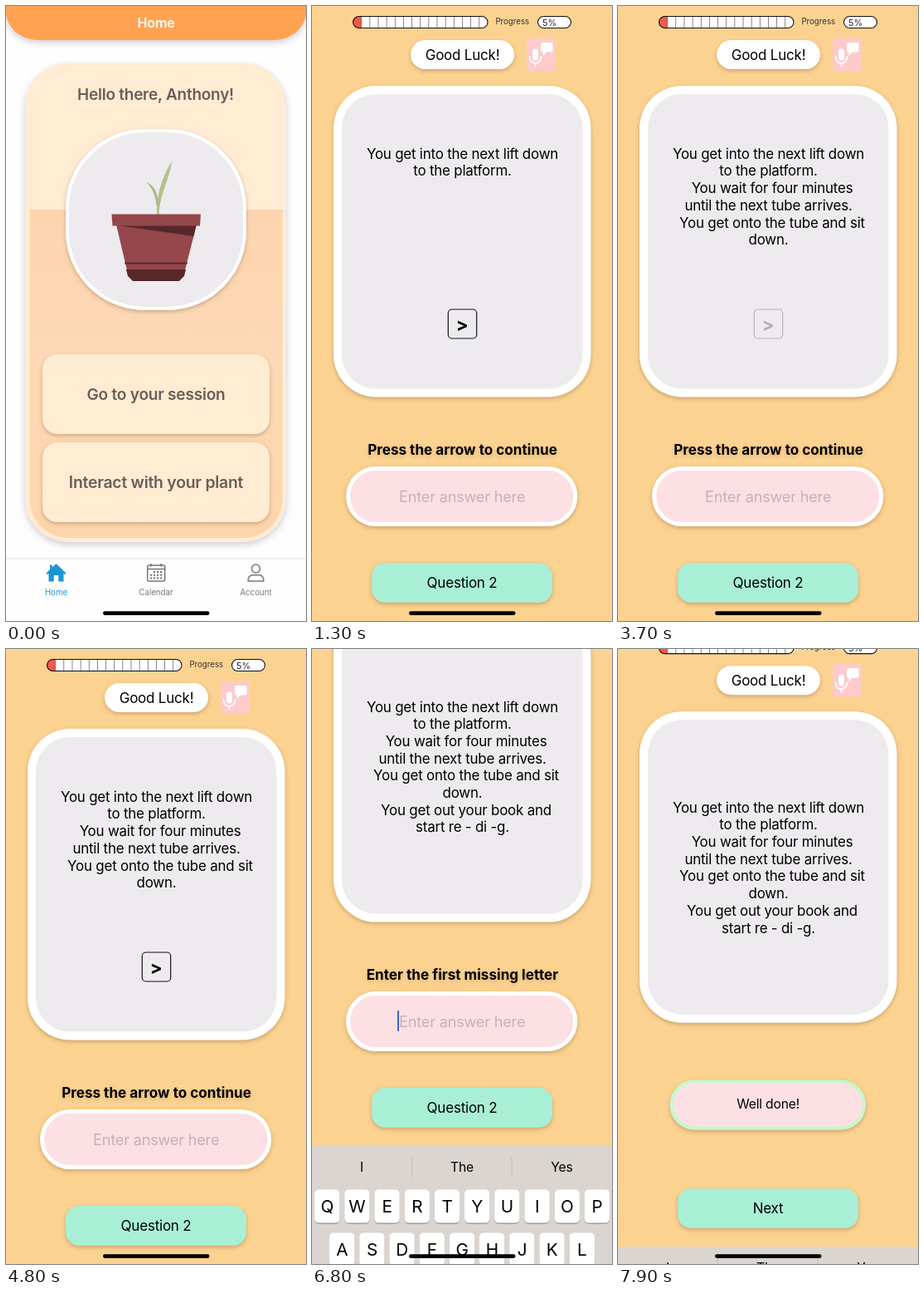
Recreate the animation shown at these times as an HTML page. Size 362 px wide and 740 px high, loop 8 s.

```html
<!DOCTYPE html>
<html lang="en">
<head>
<meta charset="utf-8">
<title>Plant app walkthrough</title>
<style>
  html, body { margin: 0; width: 100%; height: 100%; overflow: hidden; background: #fff; }
  svg { display: block; width: 362px; height: 740px; }
  text { font-family: Inter, Roboto, "Liberation Sans", sans-serif; text-anchor: middle; letter-spacing: -.013em; white-space: pre; }
  .wide { letter-spacing: 0; }
  .bold { font-weight: 700; letter-spacing: 0; }
  .semi { font-weight: 600; }
  .lift { filter: drop-shadow(.5px 2px 2.5px rgba(90, 60, 30, .3)); }
  .soft { filter: drop-shadow(0 3px 4px rgba(90, 70, 110, .28)); }
  .line { fill: none; stroke-linecap: round; stroke-linejoin: round; }
</style>
</head>
<body>
<svg id="stage" viewBox="0 0 362 740"></svg>
<script>
const W = 362, H = 740, LOOP = 8000, TICK = 100;

// markup helpers
const box = (x, y, w, h, r, fill, more = '') =>
  `<rect x="${x}" y="${y}" width="${w}" height="${h}" rx="${r}" fill="${fill}" ${more}/>`;
const text = (str, x, y, size, more = '') =>
  `<text x="${x}" y="${y}" font-size="${size}" ${more}>${str}</text>`;
const path = (d, more = '') => `<path d="${d}" ${more}/>`;
const line = (d, color, width) =>
  path(d, `class="line" stroke="${color}" stroke-width="${width}"`);
const group = (id, inner, more = '') => `<g id="${id}" ${more}>${inner}</g>`;
const each = (n, f) => Array.from({ length: n }, (_, i) => f(i)).join('');

const plant = () =>
  box(74, 150, 214, 214, 93, '#eeebef', 'stroke="#fff" stroke-width="4" class="lift"') +
  path('M182 251 C181 232 187 207 200 187 C198 207 186 224 184.5 251Z', 'fill="#b3c088"') +
  path('M181.5 240 C181 229 176 217 169 212 C179 215 184 226 183.5 240Z', 'fill="#a9b780"') +
  path('M133 263 H230 L216 318 H146Z', 'fill="#95474b"') +
  path('M134 264 H229.5 L226.5 277Z', 'fill="#56282b"') +
  path('M143 308.5 H219 L218.5 310.5 H143.5Z', 'fill="#56282b"') +
  path('M145 317 H217 L215 325 L209 331 H153 L147 325Z', 'fill="#56282b"') +
  path('M127.5 250.5 H235 L234 264.5 H128.5Z', 'fill="#95474b"');

const tabs = () => {
  const gray = '#777';
  return box(0, 665, W, 75, 0, '#fefefe') + box(0, 664.5, W, 1, 0, '#e4e4e6') +
    path('M60.5 671 L72.5 682.5 L71 684 L69.5 682.7 V692.5 H63.3 V685 H57.7 V692.5 H51.5 V682.7 L50 684 L48.5 682.5 L53 678 V672.5 H55.8 V675.5Z', 'fill="#1b96d2"') +
    box(170.7, 673, 21, 19, 1.5, 'none', `stroke="${gray}" stroke-width="1.5"`) +
    line('M171 677.5 H191.5 M175 671.5 V674 M187 671.5 V674', gray, 1.6) +
    each(11, i => box(174 + (i + 1) % 4 * 4, 680 + (i + 1 >> 2) * 3.7, 2.2, 2, 0, gray)) +
    `<circle cx="301.5" cy="677" r="5" fill="none" stroke="${gray}" stroke-width="1.5"/>` +
    line('M292 692 C292 687 294.5 684.8 298 684.8 H305 C308.5 684.8 311 687 311 692Z', gray, 1.5) +
    text('Home', 60.5, 709.3, 9.7, 'class="wide" fill="#1b96d2"') +
    text('Calendar', 181, 709.3, 9.7, `class="wide" fill="${gray}"`) +
    text('Account', 301.5, 709.3, 9.7, `class="wide" fill="${gray}"`);
};

const home = () => {
  const ink = 'class="semi" fill="#6b5d5b"';
  const cream = '#ffecd3';
  return box(0, 0, W, H, 0, '#fefefe') +
    path('M0 0 H362 V11 C358 29 343 41 322 41 H40 C19 41 4 29 0 11Z', 'fill="#ffa352" class="soft"') +
    text('Home', 181, 25.7, 16.2, 'class="semi" fill="#fff"') +
    box(23, 69, 315, 576, 52, cream, 'class="soft"') +
    path('M28.5 245 H333.5 V593 A47 47 0 0 1 286.5 640 H75.5 A47 47 0 0 1 28.5 593Z', 'fill="url(#peach)"') +
    text('Hello there, Anthony!', 180.5, 113, 19, ink) +
    plant() +
    box(44, 419, 274, 96, 18, cream, 'class="lift"') +
    box(44, 525, 274, 96, 18, cream, 'class="lift"') +
    text('Go to your session', 181, 474, 19.1, ink) +
    text('Interact with your plant', 181, 580, 19.4, ink) +
    tabs();
};

// paragraphs after the first open a little to the right
const story = [
  ['You get into the next lift down', 'to the platform.'],
  ['You wait for four minutes', 'until the next tube arrives.'],
  ['You get onto the tube and sit', 'down.'],
  ['You get out your book and', 'start re - di -g.']
];
const LEAD = 20.7;
const paragraph = (lines, p) => group('para' + p, lines.map((str, i) =>
  text(str, p && !i ? 186 : 181.5, 183.7 + (p * 2 + i) * LEAD, 16.95)).join(''));

const quiz = () =>
  box(49.5, 12.5, 162.5, 14, 7, '#fff') +
  group('fill', '', 'clip-path="url(#barClip)"') +
  each(15, i => box(59.3 + i * 10.15, 13, .7, 13, 0, '#555')) +
  box(49.5, 12.5, 162.5, 14, 7, 'none', 'stroke="#111" stroke-width="1.1"') +
  text('Progress', 241.8, 21.6, 9.7, 'class="wide" fill="#333"') +
  box(272.5, 12.5, 40, 14, 7, '#fff', 'stroke="#111" stroke-width="1.1"') +
  text('5%', 286.5, 23.7, 10.8, 'class="wide" fill="#222"') +
  box(119, 41, 125, 35, 17.5, '#fff', 'class="lift"') +
  text('Good Luck!', 181.5, 64.5, 17) +
  group('patch', box(259, 39, 35, 39, 0, '#fdcbcb')) +
  group('glyph',
    box(266, 51.5, 7, 14, 3.5, '#fff') +
    line('M262.5 61 C262.5 71.5 276.5 71.5 276.5 61 M269.5 69 V72.5', '#fff', 1.8) +
    path('M278.5 44 H288 Q290.5 44 290.5 46.5 V53 Q290.5 55.5 288 55.5 H283 L278.5 60 V55.5 Q276 55.5 276 53 V46.5 Q276 44 278.5 44Z', 'fill="#fff"')) +
  box(26, 96, 310.5, 374.5, 51, '#fff', 'class="lift"') +
  box(36, 106, 290.5, 354.5, 41, '#eeebef') +
  group('story', story.map(paragraph).join('')) +
  group('arrow', box(164.3, 365, 34.4, 35, 4.5, 'none', 'stroke="#111" stroke-width="1.2"') +
    text('&gt;', 181.3, 391, 22, 'class="bold"')) +
  group('label', text('', 181.5, 539.7, 17.1, 'class="bold"'),
    'style="filter:drop-shadow(0 2px 2px rgba(110,70,20,.22))"') +
  group('input', box(43.5, 556.5, 274.3, 67, 33.5, '#fde0e4', 'stroke="#fff" stroke-width="5" class="lift"') +
    text('Enter answer here', 181.2, 596.6, 18.2, 'fill="#c6b1b9"') +
    box(103, 577, 2, 25, 1, '#4560cc', 'id="caret"')) +
  group('praise', box(64.5, 541, 232.5, 56.5, 28, '#fde0e4', 'stroke="#c5f8cb" stroke-width="4" class="lift"') +
    text('Well done!', 181.2, 574.3, 15.7)) +
  box(72, 670, 218, 47.7, 16, '#a9efd5', 'class="lift"') +
  text('', 181, 699.7, 17, 'id="action"');

const keyboard = () => {
  const dark = '#bdb1a6';
  const key = (x, y, w, fill = '#fff') => box(x, y + 1.2, w, 40, 5, '#98918b') + box(x, y, w, 40, 5, fill);
  const row = (letters, x0, y) => [...letters].map((c, i) =>
    key(x0 + i * 36.2, y, 30.3) + text(c, x0 + 15.2 + i * 36.2, y + 27.7, 20.7)).join('');
  return box(0, 0, W, 330, 0, '#dad5d0') +
    box(120, 14, 1, 24, 0, '#c2bdb9') + box(240.5, 14, 1, 24, 0, '#c2bdb9') +
    text('I', 60, 31.3, 15.7) + text('The', 181, 31.3, 15.7) + text('Yes', 301.5, 31.3, 15.7) +
    row('QWERTYUIOP', 3, 53) + row('ASDFGHJKL', 21, 105) + row('ZXCVBNM', 57, 157) +
    key(3, 157, 40) +
    path('M23 169 L32.5 178.5 H27.5 V185.5 H18.5 V178.5 H13.5Z', 'stroke="#000" stroke-linejoin="round"') +
    key(319, 157, 40, dark) +
    line('M335 171.5 H347 Q349 171.5 349 173.5 V182 Q349 184 347 184 H335 L328.5 177.8Z M338 174.5 L344.5 181 M344.5 174.5 L338 181', '#111', 1.4) +
    key(3, 209, 39, dark) + text('123', 22.5, 234.3, 14.6) +
    key(48, 209, 39, dark) +
    '<circle cx="67.5" cy="229" r="9" fill="none" stroke="#111" stroke-width="1.5"/>' +
    '<circle cx="64.3" cy="226" r="1.4"/><circle cx="70.7" cy="226" r="1.4"/>' +
    path('M61.5 230 H73.5 C73 236.5 62 236.5 61.5 230Z') +
    key(93, 209, 176) + text('space', 181, 233.6, 15.2) +
    key(275, 209, 84, dark) + text('return', 317, 233.6, 15.4) +
    '<circle cx="40" cy="287" r="12" fill="none" stroke="#55565a" stroke-width="1.5"/>' +
    '<ellipse cx="40" cy="287" rx="5.5" ry="12" fill="none" stroke="#55565a" stroke-width="1.4"/>' +
    line('M28 287 H52 M40 275 V299 M31 279.5 Q40 284 49 279.5 M31 294.5 Q40 290 49 294.5', '#55565a', 1.3) +
    box(317.5, 273, 9, 17, 4.5, 'none', 'stroke="#55565a" stroke-width="1.5"') +
    line('M313.5 284 V286 C313.5 296.5 330.5 296.5 330.5 286 V284 M322 294 V299 M318 299 H326', '#55565a', 1.5);
};

const stage = document.getElementById('stage');
stage.innerHTML = `<defs>
    <linearGradient id="peach" x2="0" y2="1">
      <stop offset="0" stop-color="#fdd4af"/><stop offset=".45" stop-color="#fdd9b5"/><stop offset="1" stop-color="#fdd5ac"/>
    </linearGradient>
    <linearGradient id="edge"><stop stop-color="#000" stop-opacity="0"/><stop offset="1" stop-color="#000" stop-opacity=".1"/></linearGradient>
    <clipPath id="barClip">${box(49.5, 12.5, 162.5, 14, 7, '#000')}</clipPath>
  </defs>` +
  group('home', home()) +
  group('page', box(-8, 0, 8, H, 0, 'url(#edge)') + box(0, 0, W, H, 0, '#fcd290') + group('quiz', quiz())) +
  group('keys', keyboard()) +
  box(117, 728.3, 128.5, 4.6, 2.3, '#000');

const $ = id => document.getElementById(id);
const move = (id, value) => $(id).setAttribute('transform', value);
const show = (id, on) => $(id).setAttribute('display', on ? 'inline' : 'none');
const clamp = v => Math.max(0, Math.min(1, v));
const zoom = (s, cx, cy, dy = 0) =>
  `translate(${cx} ${cy + dy}) scale(${s}) translate(${-cx} ${-cy})`;

// remaining distance (1 to 0) of a critically damped spring
const spring = (ms, rate) => {
  const k = Math.max(0, ms) / 1000 * rate;
  return (1 + k) * Math.exp(-k);
};

const PUSH = 50, KEYS_UP = 6750, KEYS_DOWN = 7650, DONE = 7700;
const TAPS = [2400, 3700, 5000];

// touch feedback: dim before the release, fade back after it
const tapAlpha = d => d < -150 || d > 250 ? 1 : d < 0 ? .2 : .25 + .75 * d / 250;

function draw(t) {
  const left = spring(t - PUSH, 12.2);
  show('page', t > PUSH);
  move('page', `translate(${W * left} 0)`);
  move('home', `translate(${-108 * (1 - left)} 0)`);

  // content grows to full size after the page arrives
  const size = clamp(.637 + (t - 600) / 900);
  const rest = (1 - size) / .363;
  const squeeze = 1 - .041 * (1 - size);

  const raised = t < KEYS_DOWN ? 1 - spring(t - KEYS_UP, 30) : spring(t - KEYS_DOWN, 17.7);
  move('quiz', `translate(${181 * (1 - squeeze)} ${-321 * raised}) scale(${squeeze} 1)`);
  move('keys', `translate(0 ${H - 322 * raised})`);

  $('fill').innerHTML = box(49.5, 12, 10 * size, 15, 0, '#f4574c');
  move('patch', zoom(size, 259, 58.5));
  move('glyph', zoom(size, 273, 78));

  const taps = TAPS.filter(at => t >= at).length;
  const asking = taps === TAPS.length;
  const done = t >= DONE;
  story.forEach((_, p) => show('para' + p, p <= taps));
  move('story', zoom(size, 181, 188, asking ? 33.8 : 15 * rest));

  show('arrow', !asking);
  move('arrow', `translate(0 ${-15 * rest})`);
  $('arrow').setAttribute('opacity', Math.min(...TAPS.map(at => tapAlpha(t - at))));

  show('label', !done);
  move('label', zoom(size, 181.5, 534, 12.5 * rest));
  $('label').firstChild.textContent = asking ? 'Enter the first missing letter' : 'Press the arrow to continue';

  show('input', !done);
  move('input', zoom(size, 181, 590, -7.5 * rest));
  show('caret', t > KEYS_UP && !done);
  show('praise', done);
  $('action').textContent = done ? 'Next' : 'Question 2';
}

const start = performance.now();
function tick() {
  const t = (performance.now() - start + 10) % LOOP;
  draw(Math.floor(t / TICK) * TICK);
  requestAnimationFrame(tick);
}
tick();
</script>
</body>
</html>
```
